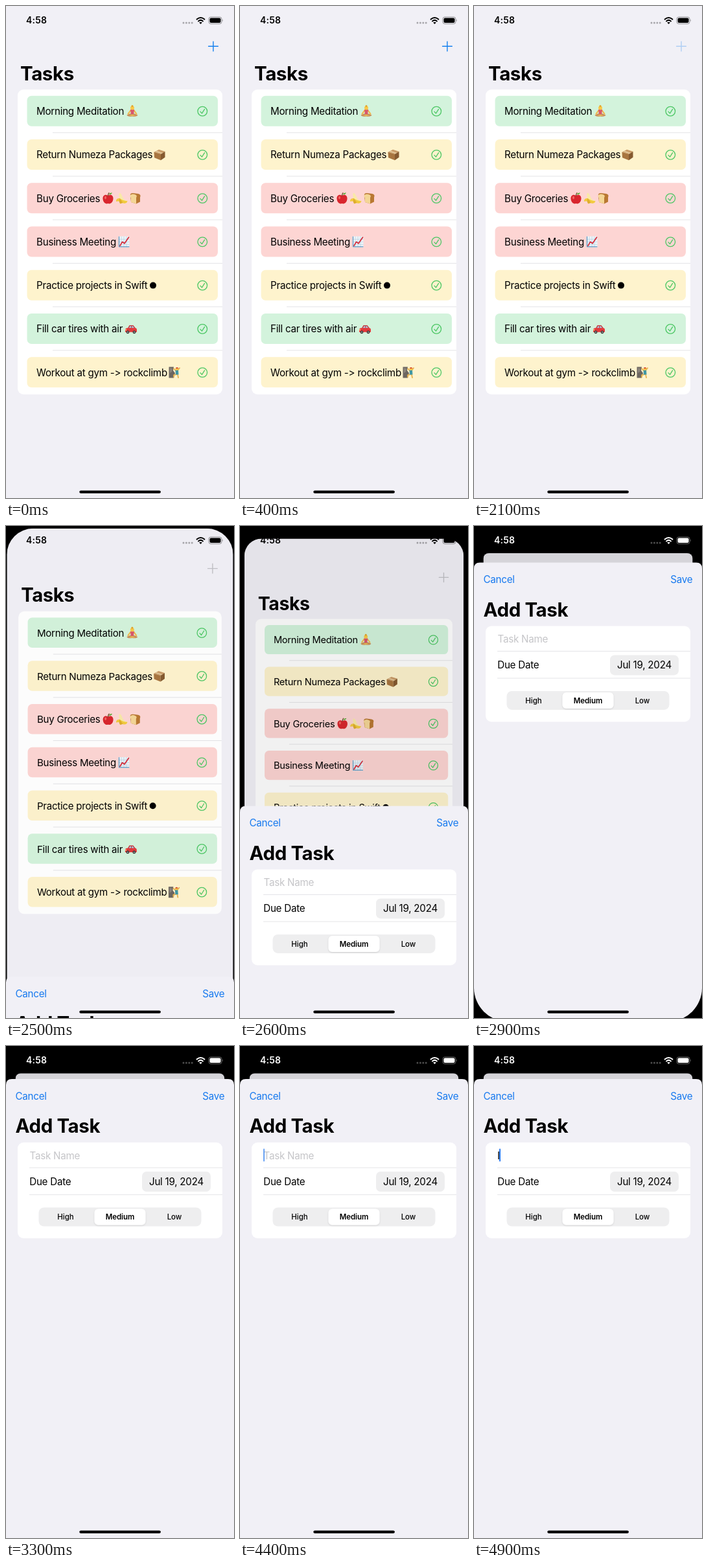
These frames come from a looping animation (352 by 760 pixels, 5 s). An HTML page:

```html
<!DOCTYPE html>
<html lang="en">
<head>
<meta charset="utf-8">
<title>Tasks</title>
<style>
  html, body { margin: 0; width: 100%; height: 100%; overflow: hidden; background: #000; }
  svg { display: block; width: 100%; height: 100%; }
  text { font: 15.2px Inter, "Liberation Sans", sans-serif; letter-spacing: -.26px; font-optical-sizing: none; }
  .title { font-size: 29.5px; font-weight: 700; letter-spacing: -.4px; }
  .clock { font-size: 14px; font-weight: 600; letter-spacing: .2px; }
  .seg { font-size: 11.5px; font-weight: 500; letter-spacing: -.05px; text-anchor: middle; }
  .on { font-weight: 600; }
  .link { fill: #1679ef; }
  .line { stroke: #e4e4e7; stroke-width: 1; }
  .stroke { fill: none; stroke-linecap: round; stroke-linejoin: round; }
</style>
</head>
<body>
<svg viewBox="0 0 352 760" preserveAspectRatio="none">
  <defs>
    <clipPath id="cardClip"><rect id="cardShape" width="352" height="810"/></clipPath>
    <filter id="soft" x="-10%" y="-20%" width="120%" height="150%">
      <feDropShadow dx="0" dy="1" stdDeviation="1.2" flood-opacity=".14"/>
    </filter>
  </defs>
  <rect width="352" height="760"/>

  <g id="card" clip-path="url(#cardClip)">
    <rect width="352" height="760" fill="#f1f0f6"/>
    <path id="plus" class="stroke" d="M312.6 62.3h14.8M320 54.9v14.8" stroke-width="1.4"/>
    <text class="title" x="22" y="114.5">Tasks</text>
    <rect x="18" y="129" width="316" height="471" rx="9" fill="#fff"/>
    <g id="rows"></g>
    <rect id="dim" width="352" height="760"/>
  </g>

  <g id="sheet">
    <path id="sheetShape" fill="#f1f0f6"/>
    <text class="link" x="14.5" y="31.6">Cancel</text>
    <text class="link" x="337.3" y="31.6" text-anchor="end">Save</text>
    <text class="title" x="14.5" y="83.3">Add Task</text>
    <rect x="18" y="98" width="316" height="148" rx="9" fill="#fff"/>
    <text id="hint" x="36.5" y="123.5" fill="#c5c5c8">Task Name</text>
    <text id="typed" x="36" y="123.5">I</text>
    <rect id="caret" x="38.7" y="107.5" width="2" height="20" rx="1" fill="#2b7cf0"/>
    <path class="line" d="M36 137h298M36 178.7h298"/>
    <text x="36.2" y="164">Due Date</text>
    <rect x="210" y="143" width="106" height="31" rx="7" fill="#eeeeef"/>
    <text x="263" y="164" text-anchor="middle">Jul 19, 2024</text>
    <rect x="50.5" y="198.5" width="251" height="29" rx="8" fill="#eeeeef"/>
    <rect x="136.5" y="200.5" width="79" height="25" rx="6" fill="#fff" filter="url(#soft)"/>
    <text class="seg" x="92" y="217.2">High</text>
    <text class="seg on" x="176" y="217.2">Medium</text>
    <text class="seg" x="260" y="217.2">Low</text>
  </g>

  <g id="status">
    <text class="clock" x="31" y="27.2">4:58</text>
    <g opacity=".3">
      <circle cx="274" cy="26" r="1.5"/><circle cx="278.4" cy="26" r="1.5"/>
      <circle cx="282.8" cy="26" r="1.5"/><circle cx="287.2" cy="26" r="1.5"/>
    </g>
    <path id="wifi" class="stroke" d="M294.6 20.6q5.9-5.2 11.8 0M297 23.4q3.5-3 7 0" stroke-width="2"/>
    <path d="M298.2 25.6q2.3-1.8 4.6 0l-2.3 2.3z"/>
    <rect id="shell" x="313" y="17" width="20" height="10.6" rx="3.2" fill="none" opacity=".4"/>
    <rect x="314.5" y="18.5" width="17" height="7.6" rx="2"/>
    <path d="M334.2 20.6q1.6 1.7 0 3.4z" opacity=".45"/>
  </g>
  <rect x="113.3" y="748.4" width="125.6" height="4.4" rx="2.2"/>
</svg>

<script>
const $ = id => document.getElementById(id);
const set = (id, attrs) => {
  for (const k in attrs) $(id).setAttribute(k, attrs[k]);
};

// Small icons, drawn around 0,0 in an 18 unit box
const icons = {
  yoga: `<path d="M-8.5 6Q0 .5 8.5 6Q7 9-.2 7.8Q-7 9-8.5 6z" fill="#c98f5c"/>
    <path class="stroke" d="M-2.5-1.5L-6.5 4M2.5-1.5L6.5 4" stroke="#f2b84a" stroke-width="2"/>
    <path d="M-3-2.5h6l-.8 7h-4.4z" fill="#d9586c"/>
    <circle cy="-5" r="3" fill="#f8c848"/><circle cy="-8" r="1.5" fill="#e0a52c"/>
    <path d="M-5 7q5-3.4 10 0z" fill="#f6c552"/>`,
  box: `<path d="M-8.5-4L-1-8L8.5-5L2-1z" fill="#c99b68"/>
    <path d="M-8.5-4L2-1V8.5L-8 4.5z" fill="#a8753f"/>
    <path d="M2-1L8.5-5V4L2 8.5z" fill="#855a30"/>
    <path d="M-4.5-6.1L5-3l-2 1.3-9.6-3.2z" fill="#e3c79a"/>`,
  apple: `<path d="M0-4C4-7 8.5-4.5 8 1C7.5 6 4 9.5 0 8C-4 9.5-7.5 6-8 1C-8.5-4.5-4-7 0-4z" fill="#d9262e"/>
    <path class="stroke" d="M0-4Q0-7 1.5-8.5" stroke="#6b4526" stroke-width="1.3"/>
    <path d="M1-6Q3-9.5 6.5-8.5Q5-5 1-6z" fill="#5fae3a"/>
    <ellipse cx="-4" cy="-1" rx="1.5" ry="2.3" fill="#ef6a64"/>`,
  banana: `<path d="M-4-8Q-1-9 1-3Q3 3 9 4Q8 8 2 7Q-5 5-4-8z" fill="#f9e9a8"/>
    <path d="M-3 0Q-9 0-8.5 5Q-3 3 2 7.5Q8 9 9 4Q3 4.5-3 0z" fill="#f2ca3f"/>
    <path d="M-3 0Q-5 6-2 8.5L2 7z" fill="#dfae2d"/>`,
  bread: `<path d="M-7-4Q-8-8-3-8L5-7Q10-6 8-1.5V5.5L2 8.5L-6 6z" fill="#b97832"/>
    <path d="M-7-5Q-4-8 1-5.5Q4-4 2-1V8.5L-6 6V-1Q-8.5-2-7-5z" fill="#f4d696"/>`,
  chart: `<rect x="-8.5" y="-8.5" width="17" height="17" rx="1" fill="#eef4f8"/>
    <path class="stroke" d="M-4-8V8M0-8V8M4-8V8M-8-4H8M-8 0H8M-8 4H8" stroke="#b5d1e3" stroke-width=".7"/>
    <path class="stroke" d="M-7.5-8V7.5H8" stroke="#5b93bd" stroke-width="1.2"/>
    <path class="stroke" d="M-6 6L-2.5 0L1 2.5L7.5-7" stroke="#d62f3c" stroke-width="1.8"/>`,
  dot: `<circle r="5"/>`,
  car: `<path d="M-5-1L-2.5-5.5H3.5L7-1z" fill="#c9232b"/>
    <path d="M-3.5-1L-1.7-4.3H.3V-1zM1.3-1V-4.3H3L5.3-1z" fill="#a9d2e8"/>
    <path d="M-9 5V1Q-8.5-1.5-5-1.5H6Q9-1.5 9 1.5V5z" fill="#e23a3c"/>
    <circle cx="-5" cy="5" r="2.4" fill="#333"/><circle cx="5" cy="5" r="2.4" fill="#333"/>
    <circle cx="-5" cy="5" r="1" fill="#bbb"/><circle cx="5" cy="5" r="1" fill="#bbb"/>
    <circle cx="-7.8" cy="1.5" r="1" fill="#ffe28a"/>`,
  climb: `<path d="M-8.5-8.5H-1L-2-3L1 1L-1 8.5H-8.5z" fill="#6d6761"/>
    <path d="M-7-7l4 1-1 5-3 2z" fill="#8c857d"/>
    <path class="stroke" d="M3-2L-1-6M4-2L8-7M3 3L-1 4V7M5 3L6 8" stroke="#e9b24a" stroke-width="1.8"/>
    <path d="M1.5-3.5h4.5l.5 7h-4.5z" fill="#3f98a5"/>
    <circle cx="4" cy="-5.6" r="2.3" fill="#f5c34a"/>
    <path d="M1.6-6Q4-10 6.4-6z" fill="#d94b3a"/>`
};

const green = "#d3f3dc", yellow = "#fef3cd", red = "#fdd5d3";
const tasks = [
  ["Morning Meditation", green, [["yoga", 195]]],
  ["Return Numeza Packages", yellow, [["box", 237]]],
  ["Buy Groceries", red, [["apple", 157.5], ["banana", 178.5], ["bread", 199]]],
  ["Business Meeting", red, [["chart", 182]]],
  ["Practice projects in Swift", yellow, [["dot", 227]]],
  ["Fill car tires with air", green, [["car", 193]]],
  ["Workout at gym -&gt; rockclimb", yellow, [["climb", 260]]]
];

$("rows").innerHTML = tasks.map(([name, color, marks], i) => `
  <g transform="translate(0 ${162.3 + 67.25 * i})">
    <rect x="32.5" y="-23.6" width="294.5" height="47" rx="7" fill="${color}"/>
    <text x="47" y="5.9">${name}</text>
    ${marks.map(([k, x]) => `<g transform="translate(${x} .3)">${icons[k]}</g>`).join("")}
    <g class="stroke" stroke="#4cc764" stroke-width="1.3">
      <circle cx="303.3" cy=".3" r="7.3"/><path d="M300 .8L302.5 3.6L306.6-2.9"/>
    </g>
    ${i < 6 ? '<path class="line" d="M72 33.4H334"/>' : ""}
  </g>`).join("");

const STEP = 100, LOOP = 5000, TOP = 51, TRAVEL = 709;

// Linear interpolation through [time, value] points
function track(points, t) {
  let [t0, v0] = points[0];
  for (const [t1, v1] of points) {
    if (t < t1) return t <= t0 ? v0 : v0 + (v1 - v0) * (t - t0) / (t1 - t0);
    [t0, v0] = [t1, v1];
  }
  return v0;
}

const springTime = [[2300, 0], [2400, .08], [2500, .5], [2600, 1.56], [2700, 3.1], [2900, 6.95], [3300, 14]];
const caretFade = [[3700, 0], [3800, .5], [3900, 1], [4300, 1], [4400, .7], [4500, .25],
  [4600, 0], [4700, .25], [4800, .8], [4900, 1]];

// Critically damped spring, 0 to 1
function sheetProgress(t) {
  const u = track(springTime, t);
  return 1 - (1 + u) * Math.exp(-u);
}

function sheetPath(r) {
  const b = TRAVEL;
  return `M0 9Q0 0 9 0H343Q352 0 352 9V${b - r}A${r} ${r} 0 0 1 ${352 - r} ${b}H${r}A${r} ${r} 0 0 1 0 ${b - r}z`;
}

function draw(t) {
  const p = sheetProgress(t);
  const moving = p > 0;
  const scale = 1 - .0825 * p;

  set("card", { transform: `translate(${176 * (1 - scale)} ${42.2 * p}) scale(${scale})` });
  set("cardShape", { rx: moving ? 44 - 35 * p : 0 });
  set("dim", { opacity: .12 * p });
  set("plus", {
    stroke: moving ? "#c0c0c5" : "#1680ee",
    opacity: t >= 2100 && t < 2200 ? .3 : 1
  });

  set("sheet", {
    transform: `translate(0 ${TOP + TRAVEL * (1 - p)})`,
    visibility: moving ? "visible" : "hidden"
  });
  set("sheetShape", { d: sheetPath(t < 3300 ? 52 : 0) });

  const typing = t >= 4900;
  set("hint", { visibility: typing ? "hidden" : "inherit" });
  set("typed", { visibility: typing ? "inherit" : "hidden" });
  set("caret", { x: typing ? 39 : 36, opacity: track(caretFade, t) });

  const level = Math.round(track([[2600, 0], [2700, 130], [2800, 255]], t));
  const ink = `rgb(${level},${level},${level})`;
  set("status", { fill: ink });
  set("wifi", { stroke: ink });
  set("shell", { stroke: ink });
}

const start = performance.now();
function tick() {
  const t = (performance.now() - start) % LOOP;
  draw(Math.floor(t / STEP) * STEP);
  requestAnimationFrame(tick);
}
tick();
</script>
</body>
</html>
```
